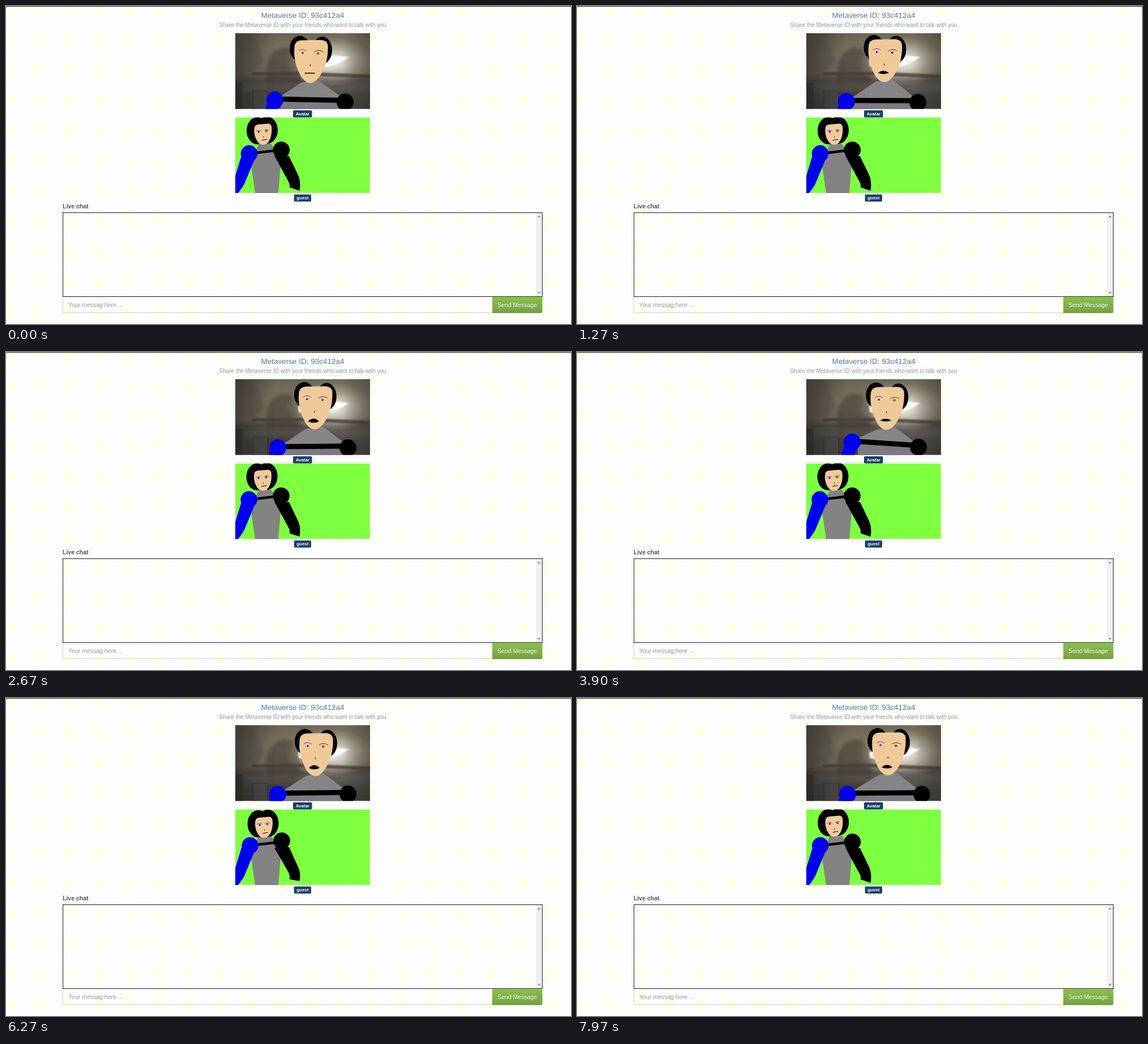
These frames come from a looping animation (998x561 px, 8000 ms). An HTML page:

```html
<!DOCTYPE html>
<html lang="en">
<head>
<meta charset="utf-8">
<title>Video chat</title>
<style>
  html, body { margin: 0; width: 100%; height: 100%; overflow: hidden; background: #fdfdfd; }
  svg { display: block; width: 100vw; height: 100vh; }
  text { font-family: "Liberation Sans", Arial, sans-serif; font-size: 10.5px; }
  .mid { text-anchor: middle; }
  .bold { font-weight: 700; }
  .badge text { font-size: 7.9px; font-weight: 700; fill: #fff; text-anchor: middle; }
  .badge rect { fill: #1a3f6d; }
  .line { fill: none; stroke: #000; }
</style>
</head>
<body>
<svg viewBox="0 0 998 561">
  <defs>
    <radialGradient id="spot">
      <stop offset=".45" stop-color="#ffffec"/>
      <stop offset="1" stop-color="#ffffec" stop-opacity="0"/>
    </radialGradient>
    <pattern id="dots" x="30" y="32" width="53.4" height="53.5" patternUnits="userSpaceOnUse">
      <circle cx="26.7" cy="26.7" r="17" fill="url(#spot)"/>
    </pattern>
    <linearGradient id="wall" x2="0" y2="1">
      <stop offset="0" stop-color="#726a58"/>
      <stop offset=".3" stop-color="#8a816c"/>
      <stop offset=".52" stop-color="#857c69"/>
      <stop offset=".62" stop-color="#55514a"/>
      <stop offset="1" stop-color="#43423e"/>
    </linearGradient>
    <linearGradient id="shade">
      <stop offset="0" stop-color="#252520" stop-opacity=".65"/>
      <stop offset=".3" stop-color="#252520" stop-opacity=".12"/>
      <stop offset=".8" stop-color="#252520" stop-opacity="0"/>
      <stop offset="1" stop-color="#252520" stop-opacity=".4"/>
    </linearGradient>
    <radialGradient id="glow">
      <stop offset="0" stop-color="#fff"/>
      <stop offset=".3" stop-color="#f3f0e8" stop-opacity=".75"/>
      <stop offset="1" stop-color="#c9c2b2" stop-opacity="0"/>
    </radialGradient>
    <linearGradient id="green" x2="0" y2="1">
      <stop offset="0" stop-color="#8dc04b"/>
      <stop offset="1" stop-color="#73a241"/>
    </linearGradient>
    <filter id="soft" x="-30%" y="-30%" width="160%" height="160%"><feGaussianBlur stdDeviation="3"/></filter>
    <filter id="slight"><feGaussianBlur stdDeviation=".9"/></filter>
    <clipPath id="topView"><path d="M405 48H643V181.5H405Z"/></clipPath>
    <clipPath id="lowView"><path d="M405 196.5H643V330H405Z"/></clipPath>
  </defs>

  <rect width="998" height="561" fill="#fdfdfd"/>
  <rect width="998" height="561" fill="url(#dots)"/>
  <rect width="998" height="1.2" fill="#3a3a36"/>

  <text class="mid" x="524" y="20.5" style="font-size:13.5px" fill="#527ba8">Metaverse ID: 93c412a4</text>
  <text class="mid" x="524" y="37" style="font-size:10px" fill="#999">Share the Metaverse ID with your friends who want to talk with you</text>

  <g clip-path="url(#topView)">
    <rect x="405" y="48" width="238" height="134" fill="url(#wall)"/>
    <path d="M405 48H440L456 98 434 119H405Z" fill="#5e594b" opacity=".45" filter="url(#soft)"/>
    <path d="M460 182V110Q464 76 490 74T520 110V182Z" fill="#3f382e" opacity=".55" filter="url(#soft)"/>
    <ellipse cx="572" cy="98" rx="78" ry="44" fill="url(#glow)"/>
    <path d="M516 95L560 86 607 90 585 102 550 112 517 106Z" fill="#fff" filter="url(#slight)"/>
    <path d="M434 117L520 116 643 121V128L520 122 434 122Z" fill="#484239" opacity=".8" filter="url(#slight)"/>
    <path d="M405 135H418V182H405Z" fill="#24241f" opacity=".5"/>
    <path d="M418 134H643V151H418Z" fill="#77766f" opacity=".3" filter="url(#soft)"/>
    <path d="M436 182V150H462V182" fill="#4f5252" stroke="#2f3131" stroke-width="1.2" opacity=".8"/>
    <rect x="405" y="48" width="238" height="134" fill="url(#shade)"/>

    <path id="torso" fill="#858585"/>
    <path id="belly" fill="#7c7981"/>
    <path id="bar" class="line" stroke-width="9"/>
    <path id="arm" class="line" style="stroke:#00e" stroke-width="22"/>
    <circle id="blue" r="15" fill="#00e"/>
    <circle id="black" r="15"/>
    <g id="head">
      <ellipse cx="519" cy="75" rx="18" ry="22.5"/>
      <ellipse cx="558.5" cy="78" rx="17.5" ry="24"/>
      <path fill="#efca98" d="M510 69Q512 61 522 60.5L557 60Q567 61 568.5 69C570 95 561 115 552 127Q545 135.5 537 136 529 135 522 126C512 108 507 90 510 69Z"/>
      <path class="line" style="stroke:#6633c8" d="M517 79.5Q523 73.5 531 79.5"/>
      <path class="line" style="stroke:#4a3520" d="M544 81Q552 75.5 560 81"/>
      <circle cx="524" cy="82.7" r="1.7" fill="#2a10c0"/>
      <circle cx="551.3" cy="83.7" r="1.7"/>
      <path class="line" d="M537.3 103V106.5"/>
    </g>
    <path id="mouth" stroke="#000" stroke-width="1.3" stroke-linejoin="round"/>
  </g>

  <g clip-path="url(#lowView)">
    <rect x="405" y="196.5" width="238" height="134" fill="#7eff40"/>
    <path class="line" style="stroke:#a5f57c" d="M405 329.5H642.5V196"/>
    <path fill="#838383" d="M447 243H468L474 252 487 260 481 330H440L431 268 441 255Z"/>
    <path class="line" stroke-width="4.5" d="M440 259.2L478 254.8"/>
    <path fill="#00e" d="M416 264L405 300V331H409Q420 318 423 309L440 268Z"/>
    <path id="sleeve"/>
    <circle id="userBlue" cy="260.3" r="14.7" fill="#00e"/>
    <circle id="userBlack" r="14.8"/>
    <g id="userHead">
      <ellipse cx="444" cy="220" rx="19" ry="24"/>
      <ellipse cx="461" cy="219" rx="19" ry="24"/>
      <path fill="#f0cb9c" d="M439 214Q440 209.5 446 209L463 207.5Q468.5 208 469 213C470.5 226 467 237 461 242.5Q455 246.5 448 243C440 236 437 224 439 214Z"/>
      <path class="line" style="stroke:#7a3fc0" d="M441.5 221Q446 217.5 450.5 220.5"/>
      <path class="line" style="stroke:#4a3520" stroke-width=".8" d="M456 219.5Q460 216.5 464.5 219"/>
      <circle cx="446.5" cy="222" r="1.7" fill="#3a14c4"/>
      <circle cx="460" cy="220.8" r="1.5"/>
      <path class="line" d="M455 230V232M451.5 237L461 235.2"/>
    </g>
  </g>

  <g class="badge">
    <rect x="507" y="184" width="33.5" height="12.5" rx="2"/>
    <text x="523.8" y="193">Avatar</text>
    <rect x="508.7" y="332.5" width="30.3" height="12.5" rx="2"/>
    <text x="523.8" y="341.4">guest</text>
  </g>

  <text class="bold" x="100" y="357" fill="#555">Live chat</text>
  <rect x="936" y="365" width="11" height="147" fill="#f0f0f0"/>
  <path d="M938.6 373H944.4L941.5 369.5ZM938.6 504.5H944.4L941.5 508Z" fill="#949494"/>
  <rect x="100.6" y="364.6" width="846.7" height="148" fill="none" stroke="#2b2b28" stroke-width="1.1"/>
  <path d="M100.5 513V541H859" fill="none" stroke="#ccc"/>
  <text x="110" y="531" fill="#999">Your messag here ...</text>
  <path d="M859 513H947.5V539Q947.5 541.5 945 541.5H859Z" fill="url(#green)"/>
  <path d="M859 541H945" stroke="#699638"/>
  <text class="mid" x="903" y="531" fill="#fff" style="text-shadow:0 -1px 0 rgba(0,0,0,.2)">Send Message</text>
</svg>
<script>
  const LOOP = 8000;
  // time, head x, head y, mouth y, mouth opening, blue x, y, black x, y, user x, y
  const POSES = [
    [0,    0,   0,    118.5, 0, 475, 166,   599, 169.5, 0, 0],
    [1270, 5.5, -1.5, 117,   5, 476, 168.5, 602, 170,   0, 0],
    [2670, 7.8, .5,   121,   7, 480, 169,   604, 169,  -.4, .3],
    [3900, 9.3, 1.4,  120,   4, 486, 159,   603, 168,  -.5, .2],
    [4900, 6.5, -.2,  118,   5, 478, 169.5, 604, 169.5, -.6, 0],
    [6270, 9,   2,    122,   7, 480, 170,   604, 169.5, 1.6, 2],
    [7970, 12,  .5,   121,   6, 478, 170,   609, 170,   .2, 0]
  ];
  const $ = id => document.getElementById(id);
  const shift = (id, x, y) => $(id).setAttribute("transform", `translate(${x} ${y})`);
  const path = (id, d) => $(id).setAttribute("d", d);

  function poseAt(time) {
    const next = POSES.findIndex(p => p[0] > time);
    if (next < 0) return POSES[POSES.length - 1];
    const a = POSES[next - 1], b = POSES[next];
    const k = (time - a[0]) / (b[0] - a[0]);
    return a.map((v, i) => v + (b[i] - v) * k);
  }

  function draw(time) {
    const [, hx, hy, my, open, bx, by, kx, ky, ux, uy] = poseAt(time);
    const left = bx + 10, right = kx - 8;
    shift("head", hx, hy);
    shift("blue", bx, by);
    shift("black", kx, ky);
    path("torso", `M${522 + hx} ${135 + hy}L${552 + hx} ${131 + hy}L${right} ${ky - 10}V182H${left}V${by - 7}Z`);
    path("belly", `M${left} ${by}L${right} ${ky}V182H${left}Z`);
    path("bar", `M${bx} ${by - 2}L${kx} ${ky - 3}`);
    path("arm", `M${bx} ${by}L${bx - 9} ${by + 26}`);
    const mx = 536.5 + hx - open * .15;
    path("mouth", `M${mx - 8.5} ${my + open * .15}Q${mx} ${my - open * .95} ${mx + 8.5} ${my + open * .15}Q${mx} ${my + open * .75} ${mx - 8.5} ${my + open * .15}Z`);

    shift("userHead", ux, uy);
    $("userBlue").setAttribute("cx", 429.5 + ux);
    shift("userBlack", 486.3 + ux * .5, 254 - uy);
    path("sleeve", `M474 264L498 ${308 - uy}Q502 ${314 - uy} 501 ${320 - uy * .1}L518.5 ${326 - uy * 1.5}Q521.5 ${309 - uy} 515 296L500 ${265 - uy}Z`);
  }

  const start = performance.now();
  function tick() {
    draw((performance.now() - start) % LOOP);
    requestAnimationFrame(tick);
  }
  tick();
</script>
</body>
</html>
```
